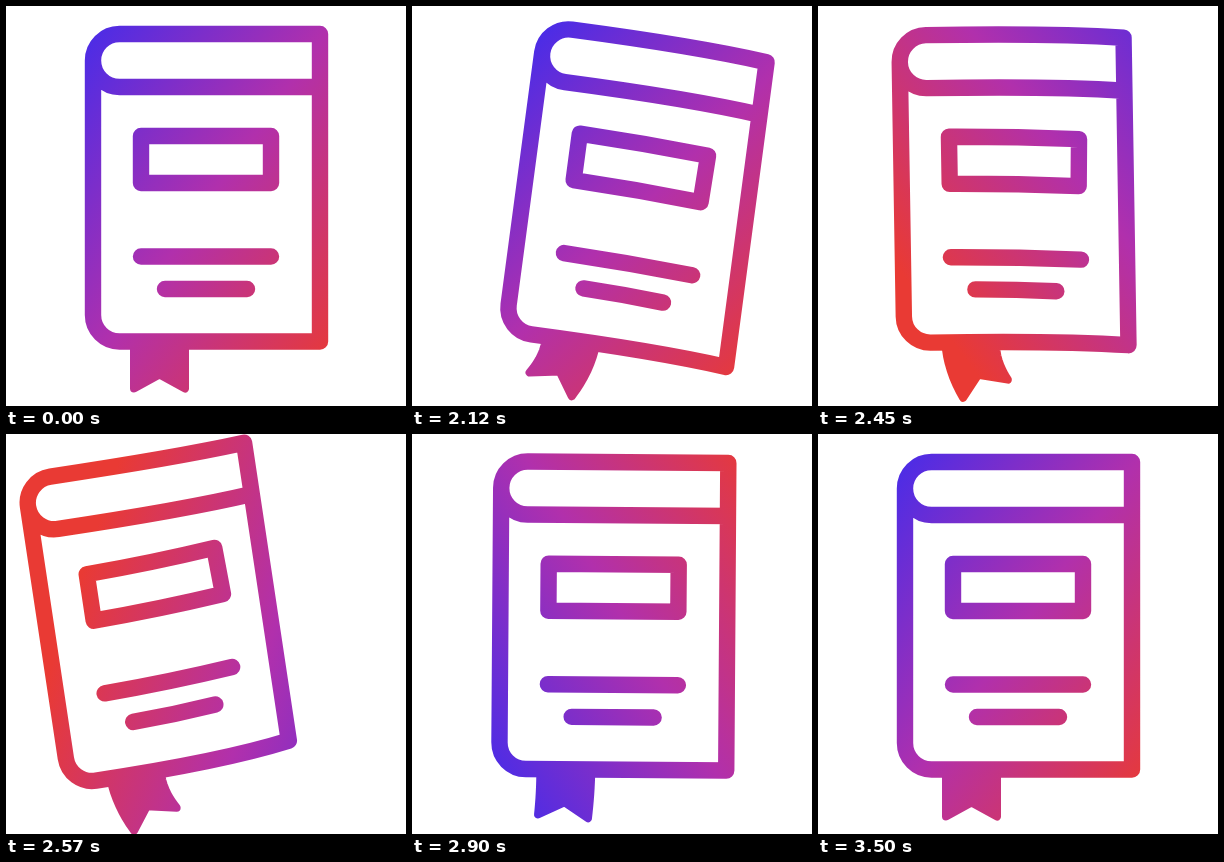
These frames come from a looping animation (400x400 px, 3520 ms). An HTML page with a canvas:

```html
<!DOCTYPE html>
<html lang="en">
<head>
<meta charset="utf-8">
<title>Swinging book</title>
<style>
html, body { margin: 0; width: 100%; height: 100%; overflow: hidden; background: #fff; }
canvas { display: block; }
</style>
</head>
<body>
<canvas id="stage" width="400" height="400"></canvas>
<script>
const ctx = document.getElementById('stage').getContext('2d');
const LOOP = 3520, REST = 2020, START = 2000, LENGTH = 1500;

// Turning points of each motion: milliseconds after the start, value
const TILT = [[0, 0], [275, 14], [600, -8.8], [1060, 2.8], [1500, 0]];
const BEND = [[50, 0], [300, 20], [715, -14.5], [1060, 8], [1500, 0]];
const RIBBON = [[0, 0], [130, -.4], [330, .4], [570, .38], [770, -.6], [1030, .28], [1500, 0]];

function ease(u) {
  const s = Math.sin(Math.min(1, Math.max(0, u)) * Math.PI / 2);
  return s * (1 + s) / 2;
}

function track(points, ms) {
  let value = points[0][1];
  for (let i = 1; i < points.length; i++) {
    const [t0, v0] = points[i - 1], [t1, v1] = points[i];
    value += (v1 - v0) * ease((ms - t0) / (t1 - t0));
  }
  return value;
}

// The top, bottom and label curve differently; backward bends lift the bottom more
function bookPath(bend, recoil) {
  const p = new Path2D();
  const top = bend - .4 * recoil, bottom = bend + .4 * recoil;
  const label = .77 * bend + .15 * recoil;
  const right = 314 - Math.min(5, Math.abs(bend) / 2);
  const curve = (x0, x1, y, drop) => {
    p.moveTo(x0, y);
    p.quadraticCurveTo((x0 + x1) / 2, y + drop * .2, x1, y + drop);
  };

  p.moveTo(113.5, 28);
  p.quadraticCurveTo(240, 28, right, 28 + top);
  p.lineTo(right, 335.5 + bottom);
  p.quadraticCurveTo(240, 335.5, 113.5, 335.5);
  p.arcTo(87, 335.5, 87, 309, 26.5);
  p.lineTo(87, 54.5);
  p.arcTo(87, 28, 113.5, 28, 26.5);
  p.closePath();
  p.moveTo(87, 54.5);
  p.arcTo(87, 81, 113.5, 81, 26.5);
  p.quadraticCurveTo(240, 81, right, 81 + top + (bottom - top) * .17);

  const lean = label * .25;
  curve(135, 265, 130, label);
  p.lineTo(265 - lean, 177 + label);
  p.quadraticCurveTo(200, 177 + label * .2, 135, 177);
  p.closePath();
  curve(135, 265, 250.5, label);
  curve(159, 241 - lean, 283, label * .7);
  return p;
}

function ribbonPath(swing) {
  const p = new Path2D(), depth = 47;
  const add = (w, v) => {
    const k = v / depth, wide = w * (1 - .3 * Math.abs(swing) * k);
    p.lineTo(153.5 + wide + 36 * swing * k * k, 335.5 + v - wide * swing * k);
  };
  for (let i = 0; i <= 8; i++) add(-25.5, depth * i / 8);
  add(0, 33);
  for (let i = 8; i >= 0; i--) add(25.5, depth * i / 8);
  p.closePath();
  return p;
}

// One full turn of the colours, sliding back when the book is far left
function gradient(x, y, ms) {
  const turn = 1 - (1 - (ms / LENGTH) ** 2) ** 3.8;
  const angle = (35 + 360 * turn) * Math.PI / 180;
  const shift = 8 - 135 * Math.exp(-(((ms - 555) / 130) ** 2));
  const at = d => [x + 113 + Math.cos(angle) * d, y + 130 + Math.sin(angle) * d];
  const g = ctx.createLinearGradient(...at(shift - 200), ...at(shift + 200));
  ['#482ce8', '#b130ac', '#e93a34'].forEach((color, i) => g.addColorStop(i / 2, color));
  return g;
}

function draw(ms) {
  const tilt = track(TILT, ms), bend = track(BEND, ms), recoil = Math.min(0, bend);
  const x = 87 + 5.7 * tilt + 2.1 * recoil;
  const y = 54.5 - 1.65 * tilt + .077 * tilt * tilt + .2 * recoil;
  const matrix = new DOMMatrix().translate(x, y).rotate(tilt).translate(-87, -54.5);
  const place = path => {
    const p = new Path2D();
    p.addPath(path, matrix);
    return p;
  };
  const ribbon = place(ribbonPath(track(RIBBON, ms)));
  ctx.fillStyle = '#fff';
  ctx.fillRect(0, 0, 400, 400);
  ctx.fillStyle = ctx.strokeStyle = gradient(x, y, ms);
  ctx.lineCap = ctx.lineJoin = 'round';
  ctx.lineWidth = 8;
  ctx.fill(ribbon);
  ctx.stroke(ribbon);
  ctx.lineWidth = 16.4;
  ctx.stroke(place(bookPath(bend, recoil)));
}

// The motion runs in 25 ms steps, odd ones starting 5 ms early
function tick() {
  const t = performance.now() % LOOP;
  const step = Math.floor(t / 50) * 50 + (t % 50 >= 20 ? 25 : 0);
  draw(t < REST ? 0 : Math.min(LENGTH, step - START));
  requestAnimationFrame(tick);
}
tick();
</script>
</body>
</html>
```
